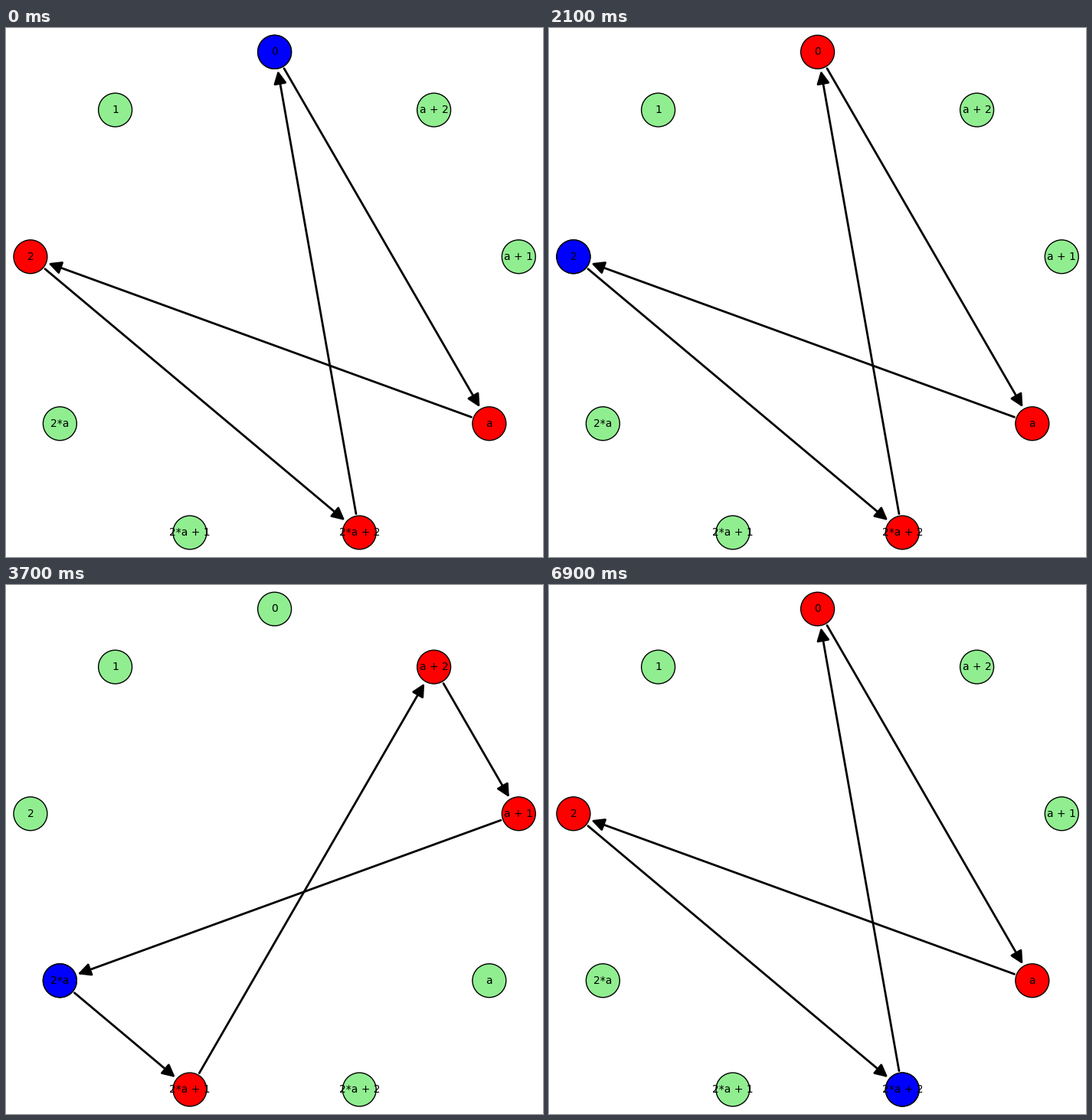
A matplotlib script that plays this animation: 701x691 px, repeating every 8000 ms.

```python
import numpy as np
import matplotlib.pyplot as plt
from matplotlib.animation import FuncAnimation
from matplotlib.patches import FancyArrowPatch

W, H, DPI = 701, 691, 100
INTERVAL, LOOP = 100, 8000      # ms
STEP, LEAD = 1600, 1100         # time per element, time already spent on the first

LABELS = ["0", "1", "2", "2*a", "2*a + 1", "2*a + 2", "a", "a + 1", "a + 2"]
ORBITS = [[0, 6, 2, 5], [1], [8, 7, 3, 4]]
NODE_SIZE = 1000

plt.rcParams["font.family"] = "DejaVu Sans"
fig = plt.figure(figsize=(W / DPI, H / DPI), dpi=DPI, facecolor="white")
ax = fig.add_axes([0, 0, 1, 1])
ax.set_xlim(0, W)
ax.set_ylim(H, 0)
ax.axis("off")

# Elements sit on a circle, counter-clockwise from the top
angle = 2 * np.pi * np.arange(len(LABELS)) / len(LABELS)
pos = np.column_stack([350.6 - 323.6 * np.sin(angle),
                       354.95 - 323.6 * np.cos(angle)])


def make_arrow(start, end):
    gap = np.sqrt(NODE_SIZE / np.pi)
    arrow = FancyArrowPatch(
        pos[start], pos[end], arrowstyle="-|>,head_width=5,head_length=10",
        mutation_scale=1, lw=2, shrinkA=gap, shrinkB=gap,
        fc="black", ec="black", zorder=2)
    return ax.add_patch(arrow)


arrows = [[make_arrow(a, b) for a, b in zip(orbit, orbit[1:] + orbit[:1])]
          if len(orbit) > 1 else [] for orbit in ORBITS]

# The extra last point is the current element, drawn over its orbit
nodes = ax.scatter(*np.vstack([pos, pos[:1]]).T, s=NODE_SIZE,
                   c=["lightgreen"] * len(LABELS) + ["blue"],
                   edgecolors="black", linewidths=1, zorder=5)

for (x, y), label in zip(pos, LABELS):
    ax.text(x, y, label, fontsize=10, ha="center", va="center", zorder=6)


def update(i):
    current = (i * INTERVAL + LEAD) // STEP
    colors = ["lightgreen"] * len(LABELS)
    for orbit, group in zip(ORBITS, arrows):
        active = current in orbit
        for arrow in group:
            arrow.set_visible(active)
        if active:
            for n in orbit:
                colors[n] = "red"
    nodes.set_facecolor(colors + ["blue"])
    nodes.set_offsets(np.vstack([pos, pos[current]]))
    return [nodes]


anim = FuncAnimation(fig, update, frames=LOOP // INTERVAL, interval=INTERVAL,
                     repeat=True, repeat_delay=0, blit=False)
plt.show()
```
